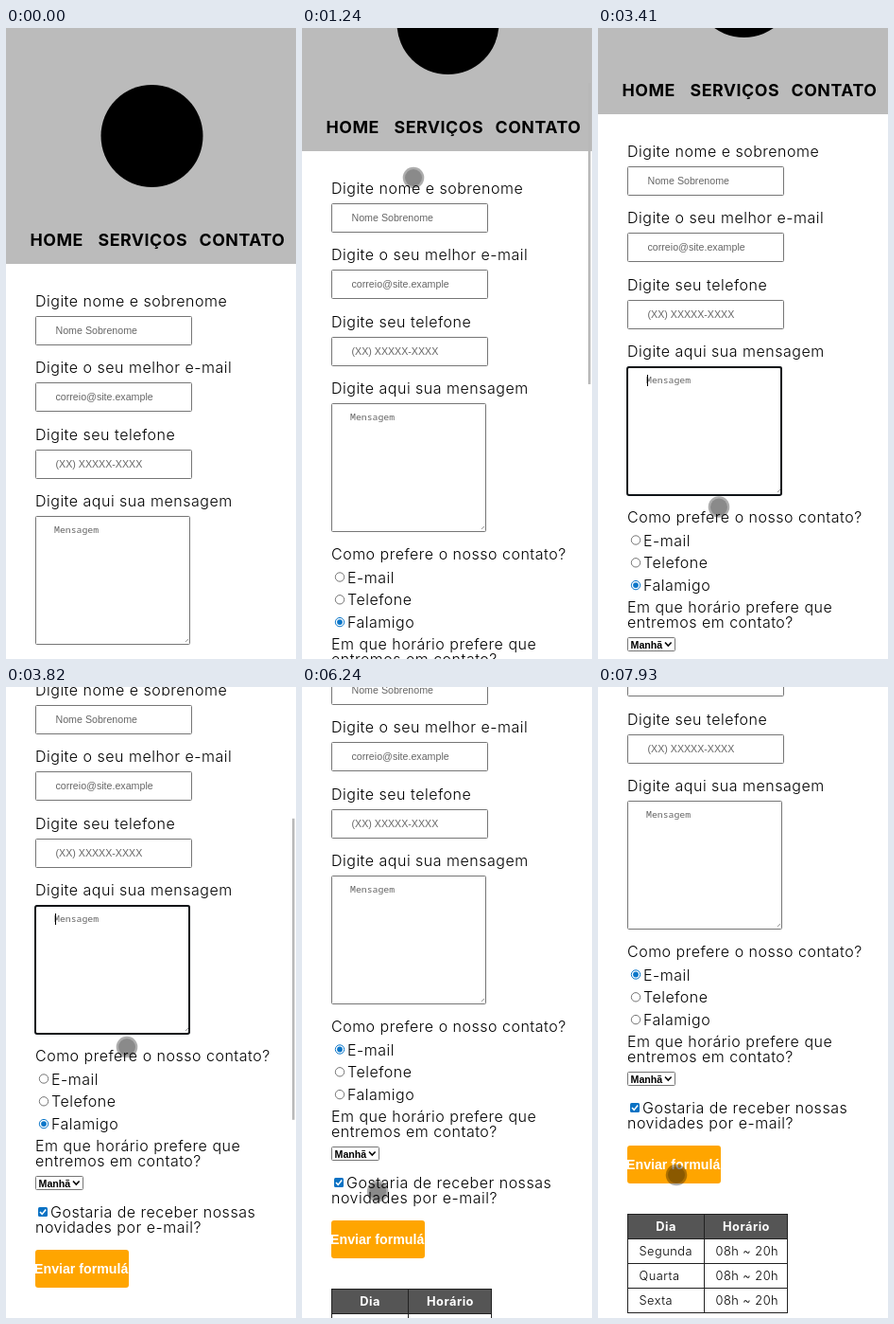
An HTML page for the animation above (8000 ms loop, 307 px wide and 666 px high).

```html
<!DOCTYPE html>
<html lang="pt-BR">
<head>
<meta charset="utf-8">
<title>Formulário de contato</title>
<style>
html, body { margin: 0; width: 307px; height: 666px; overflow: hidden; background: #fff; }
svg { display: block; }
text { font: 300 16px Inter, sans-serif; letter-spacing: .5px; fill: #000; }
text.nav { font-weight: 700; font-size: 17.8px; }
text.hint, text.opt { font: 10.67px "Liberation Sans", Arial, sans-serif; letter-spacing: 0; }
text.opt { font-weight: bold; }
text.mono { font: 9.8px "Noto Sans Mono", monospace; letter-spacing: 0; }
text.hint, text.mono { fill: #666; }
text.send { font: bold 14.2px "Liberation Sans", Arial, sans-serif; letter-spacing: 0; fill: #fff; }
text.cell { font-size: 12.8px; }
text.head { font-size: 12.8px; font-weight: 700; fill: #fff; text-anchor: middle; }
.box { fill: #fff; stroke: #767676; }
.ring { fill: none; stroke: #101418; stroke-width: 2; }
.mark { fill: none; stroke-width: 1.6; }
</style>
</head>
<body>
<svg width="307" height="666" viewBox="0 0 307 666">
  <defs><clipPath id="btn"><rect x="31" y="879" width="99" height="40" rx="3"/></clipPath></defs>
  <g id="page"></g>
  <rect id="bar" x="303" width="2.5" height="318" fill="#b8b8b8"/>
  <g id="touch">
    <circle r="11.3" opacity=".32"/>
    <circle r="9" opacity=".2"/>
  </g>
</svg>
<script>
const LOOP = 8000;
const $ = id => document.getElementById(id);
const set = (id, name, value) => $(id).setAttribute(name, value);
const show = (id, on) => set(id, 'visibility', on ? 'visible' : 'hidden');
const clamp = u => Math.max(0, Math.min(1, u));
const smooth = u => u * u * (3 - 2 * u);

const text = (x, y, s, cls = '') => `<text x="${x}" y="${y}" class="${cls}">${s}</text>`;
const box = (x, y, w, h, extra = 'class="box" rx="1"') =>
  `<rect x="${x}" y="${y}" width="${w}" height="${h}" ${extra}/>`;

const fields = [
  ['Digite nome e sobrenome', 'Nome Sobrenome'],
  ['Digite o seu melhor e-mail', 'correio@site.example'],
  ['Digite seu telefone', '(XX) XXXXX-XXXX'],
  ['Digite aqui sua mensagem', 'Mensagem']
];
const radios = ['E-mail', 'Telefone', 'Falamigo'];
const days = ['Segunda', 'Quarta', 'Sexta'];

function fieldSvg([label, hint], i) {
  const area = i === 3;
  const y = Math.round(304 + i * 70.4);
  const [w, h, x] = area ? [163, 135, 51] : [165, 30, 52.5];
  return text(31, y - 10, label) +
    box(31.5, y + .5, w, h) +
    text(x, y + (area ? 17.5 : 19), hint, area ? 'mono' : 'hint') +
    (area ? `<path d="M190 ${y + 133}l3-3" stroke="#999"/>` : '') +
    `<g id="focus${i}">` + box(31, y + 1, w, h, 'class="ring" rx="2"') +
    `<path d="M52.5 ${y + 9}v12" stroke="#000"/></g>`;
}

function radioSvg(name, i) {
  const y = 698.5 + i * 23.8;
  return `<circle id="radio${i}" cx="40" cy="${y}" r="4.7" fill="#fff"/>` +
    `<circle id="dot${i}" cx="40" cy="${y}" r="2.9"/>` + text(48, y + 6, name);
}

function tableSvg() {
  let lines = 'M31 951.5h170M31.5 951v105M112.5 951v105M200.5 951v105M31 977.5h170';
  const rows = days.map((day, i) => {
    const y = 995 + i * 26;
    lines += `M31 ${y + 8.5}h170`;
    return text(43.5, y, day, 'cell') + text(124.5, y, '08h ~ 20h', 'cell');
  });
  return box(31, 951, 170, 27, 'fill="#555"') +
    text(72, 969, 'Dia', 'head') + text(157, 969, 'Horário', 'head') +
    rows.join('') + `<path d="${lines}" fill="none" stroke="#222"/>`;
}

$('page').innerHTML =
  box(0, 0, 307, 249, 'fill="#bbb"') +
  '<circle cx="154.5" cy="114" r="54"/>' +
  text(25.5, 230, 'HOME', 'nav') + text(97.5, 230, 'SERVIÇOS', 'nav') + text(204.5, 230, 'CONTATO', 'nav') +
  fields.map(fieldSvg).join('') +
  text(31, 680, 'Como prefere o nosso contato?') +
  radios.map(radioSvg).join('') +
  text(31, 775, 'Em que horário prefere que') + text(31, 791, 'entremos em contato?') +
  box(31.5, 801.5, 50, 14) + text(34.5, 812.5, 'Manhã', 'opt') +
  '<path class="mark" d="M71 806.5l3.3 3.5 3.3-3.5" stroke="#000"/>' +
  box(34, 834, 10, 10, 'rx="1.5" fill="#0b72c4"') +
  '<path class="mark" d="M36 839l2.2 2.4 4-4.8" stroke="#fff"/>' +
  text(47, 845, 'Gostaria de receber nossas') + text(31, 861, 'novidades por e-mail?') +
  '<g clip-path="url(#btn)">' + box(31, 879, 99, 40, 'fill="orange"') +
  text(30, 904, 'Enviar formulário', 'send') + '</g>' +
  tableSvg();

// Each gesture: start, end, finger x and y at its end, distance scrolled (if any).
const gestures = [
  [200, 970, 118, 158, 105],
  [1170, 1380, 118, 158, 53],
  [1580, 1980, 121, 231],
  [2200, 2800, 125, 328],
  [3070, 3430, 128, 507],
  [3430, 3820, 128, 380, 127],
  [3870, 4130, 126, 349, 31],
  [4130, 4590, 38, 383],
  [4980, 5550, 66, 491],
  [5750, 6000, 38, 524],
  [6120, 6510, 222, 560],
  [6580, 6945, 199, 471],
  [6945, 7200, 199, 392, 79],
  [7200, 7460, 93, 503],
  [7600, 7740, 83, 515]
];
const TOUCH_AT = 70, EMAIL_AT = 4750, RELEASE_AT = 5780;
const focusAt = [1600, 2240, 2720, 3250, EMAIL_AT];

function pose(t) {
  let x = 118, y = 263, scroll = 0, bar = 0;
  for (const [start, end, toX, toY, dist = 0] of gestures) {
    const u = smooth(clamp((t - start) / (end - start)));
    x += (toX - x) * u;
    y += (toY - y) * u;
    scroll += dist * u;
    // The scrollbar lingers for 300 ms, then fades.
    if (dist) bar = Math.max(bar, Math.min(clamp((t - start) / 70), clamp((end + 500 - t) / 200)));
  }
  return { x, y, scroll: Math.round(scroll), bar };
}

function draw(t) {
  const { x, y, scroll, bar } = pose(t);
  set('page', 'transform', `translate(0 ${-scroll})`);
  set('bar', 'y', scroll * .487);
  set('bar', 'opacity', bar);
  set('touch', 'transform', `translate(${x} ${y})`);
  show('touch', t >= TOUCH_AT);
  fields.forEach((_, i) => show('focus' + i, t >= focusAt[i] && t < focusAt[i + 1]));
  const chosen = t < EMAIL_AT ? 2 : 0;
  const blue = t >= EMAIL_AT && t < RELEASE_AT ? '#1d549c' : '#0b76c9';
  radios.forEach((_, i) => {
    set('radio' + i, 'stroke', i === chosen ? blue : '#767676');
    set('dot' + i, 'fill', i === chosen ? blue : 'none');
  });
}

const start = performance.now();
function frame() {
  draw((performance.now() - start) % LOOP);
  requestAnimationFrame(frame);
}
frame();
</script>
</body>
</html>
```
